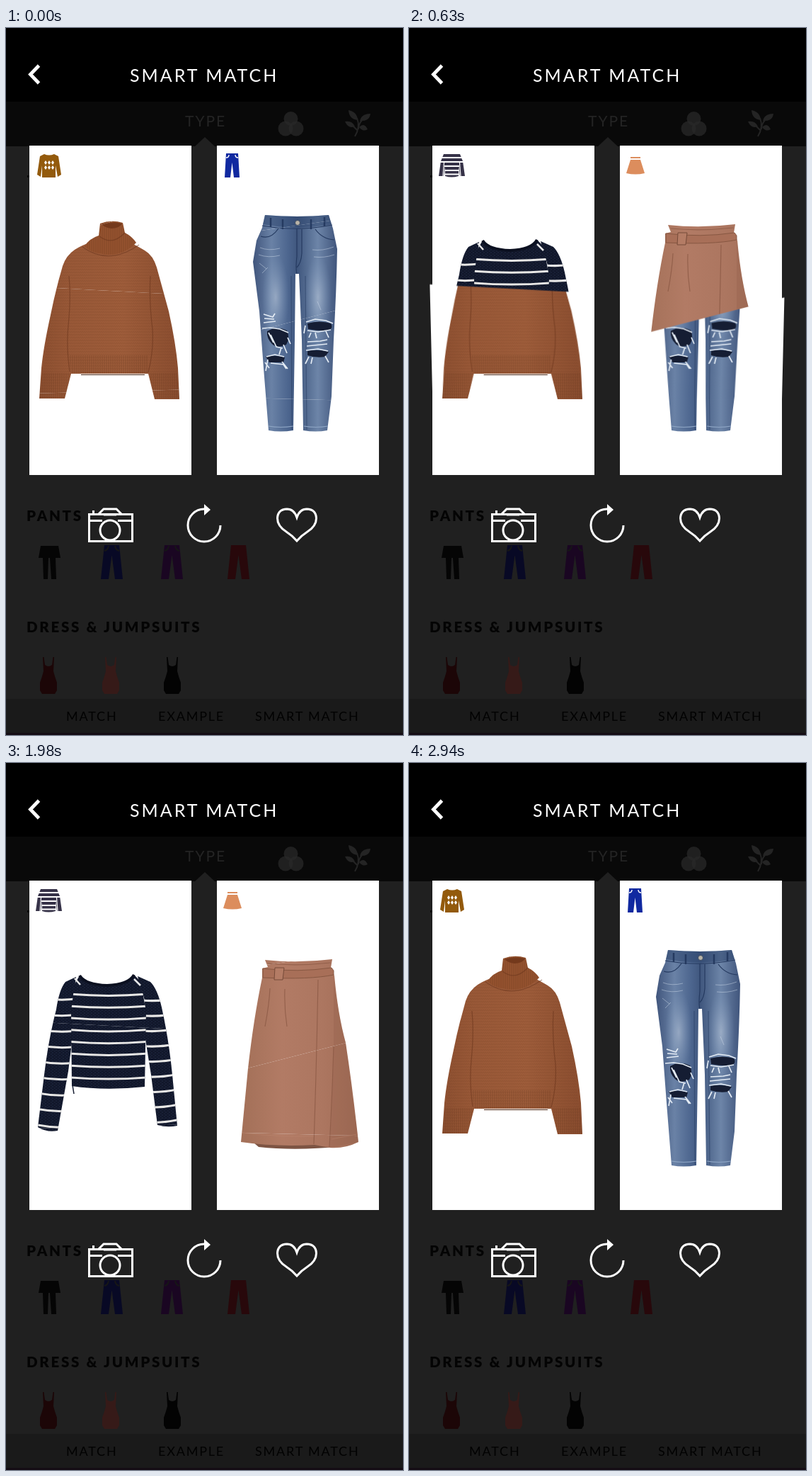
An HTML page for the animation above (3.93 s loop, 561 by 998 pixels).

```html
<!DOCTYPE html>
<html lang="en">
<head>
<meta charset="utf-8">
<title>Smart match</title>
<style>
  html, body { margin: 0; width: 100%; height: 100%; overflow: hidden; background: #202020; }
  #stage {
    position: relative; width: 561px; height: 998px; overflow: hidden;
    perspective: 800px; perspective-origin: 280px 499px;
  }
  svg { position: absolute; left: 0; top: 0; width: 561px; height: 998px; }
  text { font-family: Lato, "Open Sans", sans-serif; }
  .head { font-size: 20.5px; font-weight: 900; letter-spacing: 2.7px; fill: #040404; }
  .nav { font-size: 18px; letter-spacing: 1.8px; fill: #020202; }
  .line { fill: none; stroke: #fff; stroke-width: 3; }
</style>
</head>
<body>
<div id="stage">
<svg id="scene" viewBox="0 0 561 998">
  <defs>
    <linearGradient id="wool" x2="1">
      <stop offset="0" stop-color="#8c4f30"/><stop offset=".22" stop-color="#985837"/>
      <stop offset=".6" stop-color="#9d5c3a"/><stop offset="1" stop-color="#8a4d2f"/>
    </linearGradient>
    <linearGradient id="denim" x2="1">
      <stop offset="0" stop-color="#40557c"/><stop offset=".22" stop-color="#6a82a6"/>
      <stop offset=".42" stop-color="#4c658e"/><stop offset=".53" stop-color="#40577e"/>
      <stop offset=".77" stop-color="#6d85a8"/><stop offset="1" stop-color="#40557c"/>
    </linearGradient>
    <radialGradient id="fade">
      <stop offset="0" stop-color="#b7c5d8" stop-opacity=".6"/><stop offset="1" stop-color="#8ba4c6" stop-opacity="0"/>
    </radialGradient>
    <linearGradient id="twill" x2="1">
      <stop offset="0" stop-color="#a37058"/><stop offset=".35" stop-color="#b27b65"/>
      <stop offset=".7" stop-color="#ac7660"/><stop offset="1" stop-color="#a06c56"/>
    </linearGradient>
    <pattern id="knit" width="3" height="4" patternUnits="userSpaceOnUse">
      <path d="M0 0L1.5 2L3 0" fill="none" stroke="#5a2a12" stroke-opacity=".16" stroke-width=".8"/>
    </pattern>
    <pattern id="rib" width="3" height="6" patternUnits="userSpaceOnUse">
      <path d="M1 0V6" stroke="#4d2410" stroke-opacity=".25"/>
    </pattern>
    <pattern id="fleck" width="5" height="4" patternUnits="userSpaceOnUse">
      <path d="M0 1h2M3 3h1.5" stroke="#33405e" stroke-opacity=".6" stroke-width=".8"/>
    </pattern>
    <clipPath id="torso"><path d="M104 300L97 312L92 350L93 456Q140 463 196 457L198 350L190 308L181 299Q173 313 143 314Q112 312 104 300Z"/></clipPath>
    <clipPath id="armL"><path d="M99 302L84 309Q75 320 71 348Q60 390 54 440L45 514Q58 522 73 519L88 435L93 395L94 340Z"/></clipPath>
    <clipPath id="armR"><path d="M186 301L204 309Q214 319 220 345Q230 390 235 440L242 512Q228 515 214 511L205 440L197 390L196 335Z"/></clipPath>

    <g id="brownIcon">
      <path fill="#935a0c" d="M54 178Q61 181 68 178L74 181L78 207L73 210L70 194V211H51V194L49 210L44 207L48 181Z"/>
      <path fill="#fff" d="M56 187l2 3-2 3-2-3zM61 187l2 3-2 3-2-3zM66 187l2 3-2 3-2-3zM56 194l2 3-2 3-2-3zM61 194l2 3-2 3-2-3zM66 194l2 3-2 3-2-3z"/>
    </g>
    <g id="jeansIcon">
      <path fill="#1029a0" d="M311 177H328L330 211H322L319.500 190L317 211H309Z"/>
      <path d="M311 183q4 0 4-4M328 183q-4 0-4-4" fill="none" stroke="#fff" stroke-width="1.400"/>
    </g>
    <g id="stripeIcon">
      <path fill="#363248" d="M49 178H72L76 188L79 209H72L70 195V209Q60 212 51 209V195L49 209H42L45 188Z"/>
      <path d="M44 183H77M44 189H78M50 195H71M50 201H71M50 206.500H71" stroke="#fff" stroke-width="1.800"/>
      <path d="M49.500 190L48 209M71.500 190L73 209" stroke="#fff" stroke-width="1.200"/>
    </g>
    <g id="skirtIcon" fill="#dc8d5d"><path d="M313 182H327V184H313ZM313 186H327L333 205Q320 208 307 205Z"/></g>

    <g id="page00">
      <rect x="33" y="166" width="229" height="465" fill="#fff"/>
      <use href="#brownIcon"/>
      <path fill="url(#wool)" d="M124 301Q108 306 97 313Q85 321 80 336Q70 370 63 405Q53 450 50 480L47 523H83L92 488H201L210 524H245L243 480Q240 445 230 400L213 338Q208 321 196 314Q186 308 170 300Z"/>
      <path fill="url(#knit)" d="M124 301Q108 306 97 313Q85 321 80 336L63 405L47 523H83L92 488H201L210 524H245L230 400L213 338Q208 321 196 314L170 300Z"/>
      <path id="collar" fill="#95522f" d="M133 276Q149 270 165 275L168 289Q178 294 184 303Q168 320 145 320Q120 318 111 308Q118 297 131 293Z"/>
      <path fill="url(#rib)" d="M133 276Q149 270 165 275L168 289Q178 294 184 303Q168 320 145 320Q120 318 111 308Q118 297 131 293Z"/>
      <path fill="#74391c" d="M135 277Q149 273 164 276Q160 283 149 283Q140 282 135 277Z"/>
      <path fill="url(#rib)" d="M89 462H200L201 488H92ZM50 487H92L83 523H47ZM202 487H243L245 523H210Z"/>
      <path d="M132 294Q150 308 168 289M108 309Q145 336 188 306M89 350Q92 380 88 420Q85 450 90 485M204 350Q202 385 207 425Q209 455 201 486" fill="none" stroke="#67331a" stroke-opacity=".5" stroke-width="1.300"/>
      <path d="M106 489.500H196" stroke="#4a2412"/>
    </g>

    <g id="page01">
      <rect x="298" y="166" width="229" height="465" fill="#fff"/>
      <use href="#jeansIcon"/>
      <path fill="url(#denim)" d="M366 264Q412 268 456 264L462 283L468 312Q467 370 463 440L460 520L454 568Q438 571 420 568L418 440L414 347H409L408 440L406 568Q388 571 371 568L364 480L358 400L349 330L354 300L362 282Z"/>
      <ellipse cx="381" cy="380" rx="19" ry="62" fill="url(#fade)"/>
      <ellipse cx="441" cy="380" rx="19" ry="62" fill="url(#fade)"/>
      <path fill="#2e456e" fill-opacity=".55" d="M366 264Q412 268 456 264L460 277Q412 286 363 277Z"/>
      <g fill="none" stroke="#253a60" stroke-width="1.200">
        <path d="M362 279Q410 288 461 278M411 283V322Q409 340 411 347M418 284V318Q417 332 411 338M360 294Q374 299 385 283M464 299Q447 298 437 284"/>
        <path d="M374 268v13M391 270v14M431 270v14M450 267v13" stroke-width="2.500"/>
        <path d="M403 350L404 567M423 350L425 567" stroke-opacity=".5"/>
        <path d="M371 562Q388 565 406 562M421 562Q438 565 455 562" stroke="#8ea5c4"/>
      </g>
      <circle cx="412" cy="275" r="3.500" fill="#b9b4a8" stroke="#394860"/>
      <path d="M359 310q12 5 28 1M357 320q14 5 30 1M433 313q14 2 30-4M435 323q14 2 29-3M358 332l10 8M362 346l8-8M440 386l5 12" fill="none" stroke="#d6e0ee" stroke-opacity=".45"/>
      <g fill="#151d33">
        <path d="M369 428Q382 420 397 427Q402 438 396 447Q384 453 376 446Q368 438 369 428Z"/>
        <path d="M426 417Q443 412 459 417Q463 423 456 427Q441 428 427 425Z"/>
        <path d="M367 464Q381 461 394 465L392 472H372ZM426 456Q440 453 456 457L451 464Q438 466 426 462Z"/>
      </g>
      <g fill="none" stroke="#e3ebf4" stroke-width="1.700">
        <path d="M364 404l13 4 3-5M365 410l14 1M364 416l17-2M362 424l12-1 13 2 12 5M371 430l7 14M374 433l8 17 9 2M392 447l5 12M398 437l4 9M389 451l-3 10M368 464l12-3 13 3M366 472l6 8M374 473l18 2 4 6M390 471l8 10M370 468l-3 16"/>
        <path d="M424 415l13-4 15 2 10 4M426 427l15 2 18-3M431 430l-3 7M437 430l2 8M452 428l4 9M426 443l18-1 10-2M425 449l29-3M424 455l17-2 14 3M428 464l-5 10M433 465l-2 9M451 463l5 9M423 420l-2 11"/>
      </g>
    </g>

    <g id="page10">
      <rect x="33" y="166" width="229" height="465" fill="#fff"/>
      <use href="#stripeIcon"/>
      <g id="stripes"></g>
      <path d="M104 300Q112 313 143 314Q173 313 181 299" fill="none" stroke="#0b1020" stroke-width="4"/>
      <path d="M97 304l8 9M181 305l9 9" stroke="#e8e8e8" stroke-width="2.500"/>
      <path d="M94 455L96 467" stroke="#141b30" stroke-width="1.500"/>
    </g>

    <g id="page11">
      <rect x="298" y="166" width="229" height="465" fill="#fff"/>
      <use href="#skirtIcon"/>
      <path fill="#7d5443" d="M350 536H475V541Q410 548 357 542Z"/>
      <path fill="url(#twill)" d="M366 278Q412 283 461 277L459 289L464 300Q469 355 480 395Q490 460 498 535Q478 545 457 543L436 539Q380 542 332 535L342 431Q350 360 362 303V290L370 288Z"/>
      <path fill="#a86f58" stroke="#83543f" stroke-width=".9" d="M363 290Q412 296 460 289L463 293V299Q430 306 363 303Z"/>
      <path fill="#b47c65" stroke="#754a38" d="M380 289H393L391 306H379Z"/>
      <path fill="#8a5a46" fill-opacity=".25" d="M463 303Q469 355 480 395L498 535L458 543L463 420Z"/>
      <path d="M373 318Q372 340 366 372M394 319Q393 345 397 372M441 306Q439 420 435 538M463 400Q461 470 457 542M370 283Q412 287 458 282" fill="none" stroke="#84543f" stroke-opacity=".65" stroke-width="1.200"/>
      <path d="M334 522Q385 528 435 527M460 531L496 524" fill="none" stroke="#c28e77" stroke-opacity=".35"/>
    </g>

    <path id="pants" d="M5 0H26L31 48H20L15.500 14L11 48H0Z"/>
    <path id="dress" d="M5 0H6.500L8 11Q13 15 18 11L19.500 0H21L20 20Q22 28 25 36V47L22 52H4L1 47V36Q4 28 6 20Z"/>
  </defs>

  <rect width="561" height="998" fill="#202020"/>
  <rect width="561" height="167" fill="#090909"/>
  <rect width="561" height="104"/>
  <path d="M267 167L281 154L295 167Z" fill="#202020"/>
  <path d="M46.500 53L34.500 65.500L46.500 78" fill="none" stroke="#fff" stroke-width="4.800"/>
  <text x="175" y="76" fill="#fff" font-size="25" letter-spacing="3">SMART MATCH</text>
  <text x="253" y="139" fill="#242424" font-size="21" letter-spacing="2">TYPE</text>
  <g fill="#282828" fill-opacity=".75">
    <circle cx="402.500" cy="128" r="10"/><circle cx="395" cy="142" r="10.500"/><circle cx="410" cy="142" r="10.500"/>
  </g>
  <g fill="#242424">
    <path d="M484 116Q496 118 497 130Q485 129 484 116ZM515 121Q514 132 500 131Q502 121 515 121ZM479 132Q489 130 493 139Q484 143 479 132ZM499 140Q506 133 511 143Q504 147 499 140Z"/>
    <path d="M496 127Q501 140 493 153M503 130Q498 136 498 143M490 138L496 144" fill="none" stroke="#242424" stroke-width="2"/>
  </g>
  <rect x="30" y="208" width="3" height="3"/>

  <text class="head" x="29" y="696">PANTS</text>
  <text class="head" x="29" y="853">DRESS &amp; JUMPSUITS</text>
  <path d="M49 731H74L77 748H70L71 778H64L62 748H60L59 778H53L52 748H46Z" fill="#050505"/>
  <use href="#pants" x="134" y="730" fill="#080925"/>
  <use href="#pants" x="219" y="730" fill="#1a0622"/>
  <use href="#pants" x="313" y="730" fill="#28080b"/>
  <path d="M139 738q5-1 6-7M160 738q-5-1-6-7M224 738q5-1 6-7M245 738q-5-1-6-7" fill="none" stroke="#161616" stroke-width="2"/>
  <use href="#dress" x="47" y="888" fill="#1c0607"/>
  <use href="#dress" x="135" y="888" fill="#361a18"/>
  <use href="#dress" x="222" y="888" fill="#030303"/>
  <rect y="947" width="561" height="51" fill="#1a1a1a"/>
  <rect y="995" width="561" height="3" fill="#140c14"/>
  <text class="nav" x="85" y="978">MATCH</text>
  <text class="nav" x="215" y="978">EXAMPLE</text>
  <text class="nav" x="352" y="978">SMART MATCH</text>

  <g class="line">
    <path d="M117.500 686.500H178.500V724.500H117.500ZM131 686L138 679H156L163 686M117 695.500H136M158 695.500H178M123.500 681V687M138 687H156"/>
    <circle cx="147" cy="709" r="14"/>
    <path d="M303 702A23 23 0 1 1 280 679"/>
    <path d="M411 724Q404 716 396 711Q383.500 703 383.500 692Q384 679.500 397 679Q407 679 411 691Q415 679 425 679Q438 679.500 438.500 692Q438.500 703 426 711Q418 716 411 724Z"/>
  </g>
  <path d="M280 672L289 680L280 688Z" fill="#fff"/>
  <use id="base0"/><use id="base1"/>
</svg>
</div>
<script>
const NS = 'http://www.w3.org/2000/svg';
const stage = document.getElementById('stage');
const bases = [0, 1].map(i => document.getElementById('base' + i));

// Striped knit: each part has its own spacing and slope.
function stripes(clip, first, gap, count, x0, x1, tilt) {
  let d = '';
  for (let i = 0; i < count; i++) {
    const y = first + i * gap;
    d += `M${x0} ${y}Q${(x0 + x1) / 2} ${y + tilt / 2 + 5} ${x1} ${y + tilt}`;
  }
  return `<g clip-path="url(#${clip})"><rect x="40" y="295" width="210" height="230" fill="#11172a"/>
    <rect x="40" y="295" width="210" height="230" fill="url(#fleck)"/>
    <path d="${d}" fill="none" stroke="#e9e8e6" stroke-width="3"/></g>`;
}
document.getElementById('stripes').innerHTML =
  stripes('armL', 330, 22.500, 9, 40, 100, 3) +
  stripes('armR', 335, 21.500, 9, 192, 250, -5) +
  stripes('torso', 326, 16.800, 8, 88, 202, 0);

// Slanted cuts divide each card into strips. One after another, every strip
// flips down around the middle height of its lower cut and is gone when flat.
const LOOP = 3930, HALF = 1980, STEP = 30, FLIP = 300, END = 960;
const cards = [
  { l: 33, r: 262, cuts: [[166, 166], [307, 241], [365, 377], [516, 510], [631, 631]] },
  { l: 298, r: 527, cuts: [[166, 166], [295, 262], [442, 383], [521, 527], [631, 631]] }
];
const strips = [];
for (const n of [3, 2, 1, 0]) {
  cards.forEach(({ l, r, cuts }, card) => {
    const svg = document.createElementNS(NS, 'svg');
    const use = svg.appendChild(document.createElementNS(NS, 'use'));
    const [a, b] = [cuts[n], cuts[n + 1]];
    const lap = n ? 1.5 : 0;
    svg.setAttribute('viewBox', '0 0 561 998');
    svg.style.clipPath = `polygon(${l}px ${a[0] - lap}px, ${r}px ${a[1] - lap}px, ${r}px ${b[1]}px, ${l}px ${b[0]}px)`;
    svg.style.transformOrigin = `280px ${(b[0] + b[1]) / 2}px`;
    stage.append(svg);
    strips.push({ svg, use, card, start: n * FLIP });
  });
}

const ease = p => (1 - Math.cos(Math.PI * p)) / 2;
const show = (use, outfit, card) => use.setAttribute('href', `#page${outfit}${card}`);
let outfit = -1;

function draw(ms) {
  const t = Math.floor(ms % LOOP / STEP) * STEP;
  const old = t < HALF ? 0 : 1;
  const local = t - old * HALF;
  if (old !== outfit) {
    outfit = old;
    bases.forEach((use, card) => show(use, 1 - old, card));
    strips.forEach(s => show(s.use, old, s.card));
  }
  for (const { svg, start } of strips) {
    const p = Math.min(1, Math.max(0, (local - start) / FLIP));
    const angle = 180 * ease(p);
    const light = Math.abs(Math.cos(angle * Math.PI / 180)) ** 1.1;
    svg.style.visibility = p < 1 && local < END ? 'visible' : 'hidden';
    svg.style.transform = p ? `rotateX(${-angle}deg)` : 'none';
    svg.style.filter = p && light < .98 ? `brightness(${light})` : 'none';
  }
}

const begin = performance.now();
function tick() {
  draw(performance.now() - begin);
  requestAnimationFrame(tick);
}
tick();
</script>
</body>
</html>
```
